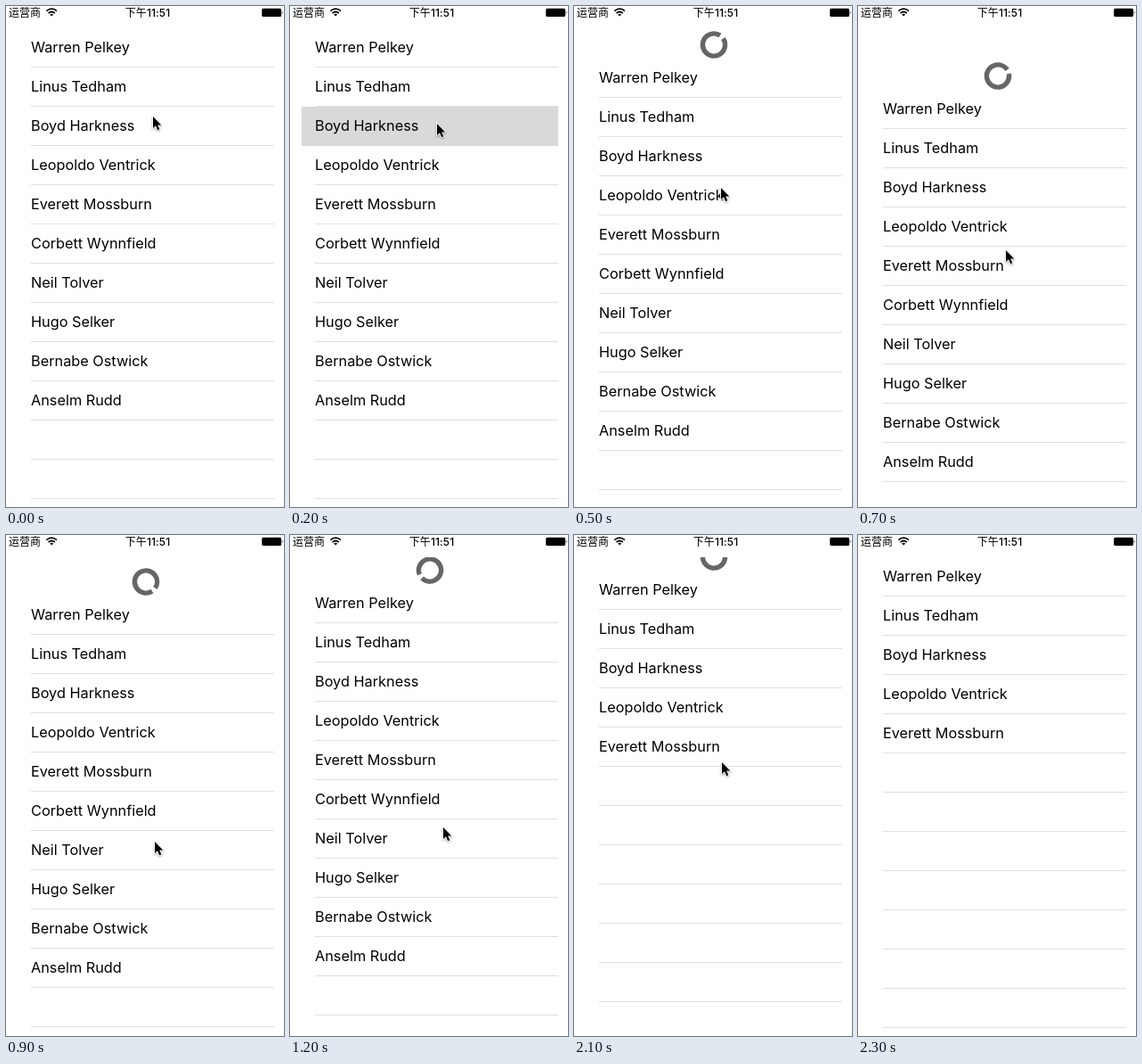
Recreate the animation shown at these times as an HTML page. Size 312x562 px, loop 2400 ms.

```html
<!DOCTYPE html>
<html lang="zh">
<head>
<meta charset="utf-8">
<title>Pull to refresh</title>
<style>
  html, body { margin: 0; width: 100%; height: 100%; overflow: hidden; background: #fff; }
  svg { display: block; }
  .row { font: 16.3px Inter, "Open Sans", sans-serif; }
  .bar { font: 12px Inter, "Noto Sans CJK SC", "Noto Sans CJK", sans-serif; }
  .time { font-weight: 500; letter-spacing: .1px; }
  #pointer { filter: drop-shadow(0 1px 1px rgba(0, 0, 0, .35)); }
</style>
</head>
<body>
<svg width="312" height="562" viewBox="0 0 312 562">
  <defs>
    <clipPath id="view"><rect y="25" width="312" height="532"/></clipPath>
  </defs>

  <g class="bar">
    <text x="3" y="11.7">运营商</text>
    <text class="time" x="159" y="11.7" text-anchor="middle">下午11:51</text>
    <g fill="none" stroke="#000" stroke-width="1.7">
      <path d="M45.4 5.6Q51.2 0.8 57 5.6"/>
      <path d="M47.6 8Q51.2 5 54.8 8"/>
    </g>
    <path d="M51.2 11.6L49.2 9.5Q51.2 8 53.2 9.5Z"/>
    <rect x="287.2" y="2.7" width="21.8" height="9.3" rx="1.5"/>
    <path d="M309.8 5.6Q311.6 7.4 309.8 9.2Z"/>
  </g>

  <g clip-path="url(#view)">
    <g id="list">
      <g id="lines" fill="#e0e0e1"></g>
      <rect id="press" x="13" y="113" width="288" height="44" fill="#d9d9d9"/>
      <g id="names" class="row"></g>
    </g>
    <circle id="ring" r="12.6" fill="none" stroke="#666" stroke-width="5.4"
      pathLength="360" stroke-dasharray="338 22"/>
  </g>

  <path id="pointer" d="M0 0V13L3 10.2L5.2 15.2L7.4 14.2L5.2 9.4H9.3Z"
    stroke="#fff" stroke-width="1.8" stroke-linejoin="round" paint-order="stroke"/>
</svg>

<script>
const LOOP = 2400, STEP = 100, ROW = 44;
const PRESS = 200, DRAG = 300, RELEASE = 700, RELOAD = 1900, DONE = 2300;
const REST = 30; // list offset while refreshing

const people = [
  "Warren Pelkey", "Linus Tedham", "Boyd Harkness", "Leopoldo Ventrick",
  "Everett Mossburn", "Corbett Wynnfield", "Neil Tolver", "Hugo Selker",
  "Bernabe Ostwick", "Anselm Rudd"
];

// Pointer path: [time, x, y]
const path = [
  [0, 165, 124], [200, 165, 132], [300, 165, 148], [500, 165, 204],
  [900, 167, 344], [1200, 172, 328], [1700, 166, 255]
];

const $ = id => document.getElementById(id);
const clamp = p => Math.min(Math.max(p, 0), 1);

function add(parent, tag, attrs, text = "") {
  const el = document.createElementNS("http://www.w3.org/2000/svg", tag);
  for (const key in attrs) el.setAttribute(key, attrs[key]);
  el.textContent = text;
  parent.append(el);
  return el;
}

function pointerAt(t) {
  const i = path.findIndex(k => k[0] > t);
  if (i < 0) return path[path.length - 1].slice(1);
  const a = path[i - 1], b = path[i], p = (t - a[0]) / (b[0] - a[0]);
  return [1, 2].map(c => a[c] + (b[c] - a[c]) * p);
}

// The list follows the finger at about half speed after a short slack.
const drag = t => Math.max(0, 0.49 * (pointerAt(t)[1] - path[0][2] - 10));

function offsetAt(t) {
  if (t < RELEASE) return drag(t);
  if (t < RELOAD) {
    const left = 1 - clamp((t - RELEASE) / 480);
    return REST + (drag(RELEASE) - REST) * left ** 2;
  }
  return REST * (1 + Math.cos(Math.PI * clamp((t - RELOAD) / (DONE - RELOAD)))) / 2;
}

const move = (el, x, y, turn = 0) =>
  el.setAttribute("transform", `translate(${x} ${y}) rotate(${turn})`);
const show = (el, on) => el.setAttribute("visibility", on ? "visible" : "hidden");

for (let i = 0; i < 12; i++) {
  add($("lines"), "rect", { x: 28, y: 68 + ROW * i, width: 273, height: 1 });
}
const labels = people.map((name, i) =>
  add($("names"), "text", { x: 28, y: 52 + ROW * i }, name));

function draw(t) {
  const y = Math.round(offsetAt(t));
  move($("list"), 0, y);
  labels.forEach((el, i) => show(el, i < 5 || t < RELOAD));
  show($("press"), t >= PRESS && t < DRAG);

  // The gap rests at 45 degrees and turns only while refreshing.
  const spin = t >= RELEASE && t < RELOAD ? (t - 633) * 0.3375 : 0;
  move($("ring"), 157, y + 9.5, spin + 45 + 11 - 90);
  show($("ring"), y > 0);

  move($("pointer"), ...pointerAt(t).map(Math.round));
  show($("pointer"), t < DONE);
}

const start = performance.now();
function tick() {
  const t = (performance.now() - start) % LOOP;
  draw(Math.floor(t / STEP) * STEP);
  requestAnimationFrame(tick);
}
tick();
</script>
</body>
</html>
```
